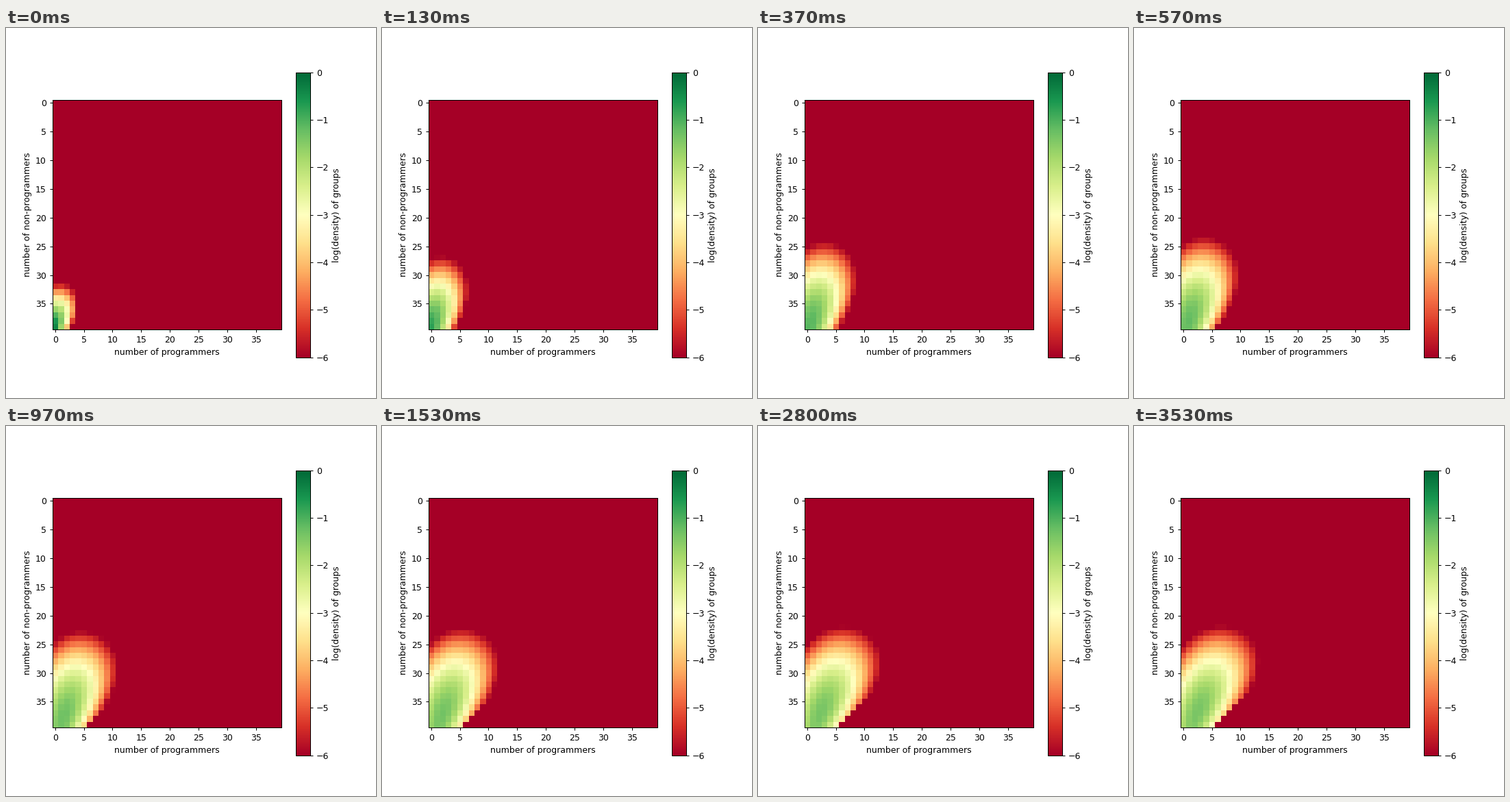
Recreate the animation shown at these times as a matplotlib script. Size 540 by 540 pixels, loop 8 s.

```python
import numpy as np
import matplotlib.pyplot as plt
from matplotlib.animation import FuncAnimation

SIZE = 40
LOOP = 8000
FRAMES = 250
STEPS_PER_FRAME = .03 * LOOP / FRAMES
LAST_STEP = 106  # the density has settled by then
FLOOR = -6
MAX_LEAD = 5     # programmers may outnumber the others by at most this

p = np.arange(SIZE)[None, :]        # programmers, left to right
n = np.arange(SIZE)[::-1, None]     # non-programmers, bottom to top


def log_density(step):
    """A ridge over n whose parts all ease with g, which decays from 1 to 0."""
    g = 1 / (1 + step / 3.5)

    # height of the ridge
    height = (-1.52 + 1.9 * g - .2 * g**2
              + (.1 - .4 * g - .2 * g**3) * n
              - (.0203 + .0212 * g**1.5) * n**2)

    # most likely number of programmers
    centre = (-1.35 + 3.35 * np.exp(-g / .33)
              + (.25 + .15 * g**2 + .19 * np.exp(-g / .06)) * n
              - (.0045 + .0135 * g**2) * n**2)

    # fall-off to both sides, gentler to the right
    reach = 5.5 - 2.7 * g**2
    fall = (.038 + .092 * g + .06 * g**2
            + (.1 + .11 * g**2) * np.exp(-n / reach))
    off = p - centre
    skew = np.clip(1 - .0015 * n * off, .75, 1.3)

    z = height - fall * skew * off**2
    return np.where(p - n > MAX_LEAD, FLOOR, np.clip(z, FLOOR, 0))


fig, ax = plt.subplots(figsize=(6, 6), dpi=90)
img = ax.imshow(log_density(0), cmap="RdYlGn", vmin=FLOOR, vmax=0,
                interpolation="nearest")
ax.set_xlabel("number of programmers")
ax.set_ylabel("number of non-programmers")
fig.colorbar(img, ax=ax, label="log(density) of groups")


def update(i):
    step = min(np.ceil(i * STEPS_PER_FRAME), LAST_STEP)
    img.set_data(log_density(step))
    return [img]


anim = FuncAnimation(fig, update, frames=FRAMES, interval=LOOP // FRAMES,
                     repeat=True, repeat_delay=0)
plt.show()
```
